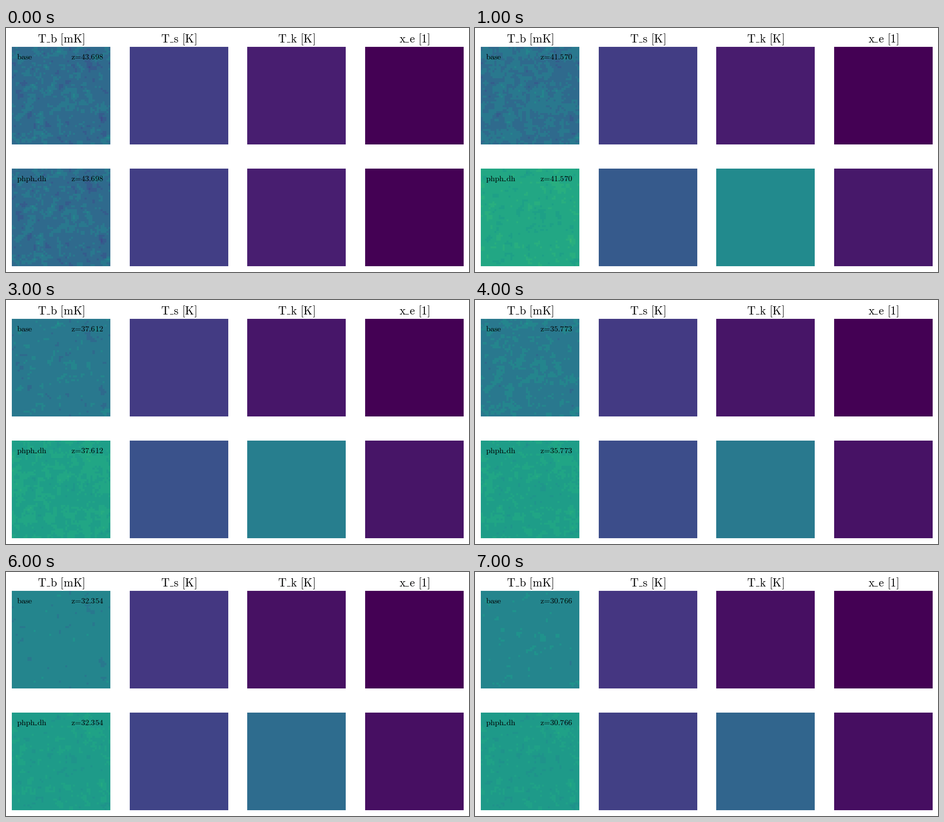
A matplotlib script for the animation above (8000 ms loop, 954 px wide and 505 px high).

```python
import numpy as np
import matplotlib.pyplot as plt
from matplotlib.animation import FuncAnimation

W, H, DPI = 954, 505, 64
PT = 72 / DPI               # points per pixel
N = 50                      # cells along one side of a map
MAP_W, MAP_H = 203, 202
LEFTS = [12 + 242.7 * c for c in range(4)]
TOPS = [39, 291]
TITLE_PX, NOTE_PX = 23.6, 16.4

plt.rcParams["mathtext.fontset"] = "cm"

# Main clumps and gaps of the density field: column, row
CLUMPS = [(5, 18), (3, 25), (5, 30), (9, 34.5), (23, 12.4), (28, 17.5),
          (38.5, 10), (45, 37), (46, 44), (37.5, 47)]
GAPS = [(26, 30), (3, 46), (15, 35), (25, 42), (30, 23), (48, 20), (20, 15),
        (6, 7)]


def blobs(points, radius):
    y, x = np.mgrid[:N, :N]
    return sum(np.exp(-((x - c) ** 2 + (y - r) ** 2) / radius ** 2)
               for c, r in points)


def make_field():
    """Cloudy noise plus the main blobs, reshaped to a bell curve."""
    rng = np.random.default_rng(4)
    f = np.fft.fftfreq(N) * N
    power = (f[:, None] ** 2 + f ** 2 + 30) ** -.75
    noise = np.fft.ifft2(np.fft.fft2(rng.normal(size=(N, N))) * power).real
    noise /= noise.std()
    field = .9 * noise - 2.6 * blobs(CLUMPS, 1.6) + 1.1 * blobs(GAPS, 3)
    rank = (field.ravel().argsort().argsort().reshape(N, N) + .5) / N ** 2
    return .55 * np.log(rank / (1 - rank))


FIELD = make_field()


def banded(base, step, offset):
    """Colour levels spaced by step from base."""
    return base + step * np.round(offset / step)


# Colormap value of each quantity at step i
def tb_base(i):
    mean = .357 + .0155 * i
    return banded(.29, .055, mean + .026 * .87 ** i * FIELD - .29)


def tb_heated(i):
    return banded(.572 - .004 * i, .03, .046 * .65 ** i - .0117 * FIELD)


def ts_base(i):
    return .186 - .0037 * i


def ts_heated(i):
    return .297 - .0156 * i


def tk_base(i):
    return .085 * .9 ** i


def tk_heated(i):
    return .505 - .0255 * i


def xe_base(i):
    return 0


def xe_heated(i):
    return .072 * .915 ** i


BASE = [tb_base, ts_base, tk_base, xe_base]
HEATED = [tb_heated, ts_heated, tk_heated, xe_heated]


def cells(rule, i):
    return np.broadcast_to(rule(i), (N, N))


fig = plt.figure(figsize=(W / DPI, H / DPI), dpi=DPI, facecolor="white")
stage = fig.add_axes([0, 0, 1, 1], zorder=2)
stage.set(xlim=(0, W), ylim=(H, 0))
stage.axis("off")


def roman(x, y, text, px):
    return stage.text(x, y, text, fontsize=px * PT, va="baseline", ha="left")


def label(x, y, head, head_em, tail, px):
    """Roman text whose two parts are joined by a low rule."""
    roman(x, y, rf"$\mathrm{{{head}}}$", px)
    rule = x + (head_em + .06) * px
    stage.add_patch(plt.Rectangle((round(rule), y - 1), round(.3 * px), 1,
                                  fc="black", lw=0))
    roman(x + (head_em + .36) * px, y, tail, px)


def unit_tail(letter, unit):
    return rf"$\mathrm{{{letter}}}\hspace{{0.38}}\mathrm{{[{unit}]}}$"


for x, head, em, letter, unit in [(65.3, "T", .722, "b", "mK"),
                                  (319.3, "T", .722, "s", "K"),
                                  (560.3, "T", .722, "k", "K"),
                                  (809.6, "x", .528, "e", "1")]:
    label(x, 30, head, em, unit_tail(letter, unit), TITLE_PX)

roman(22, 65, r"$\mathrm{base}$", NOTE_PX)
label(22, 317, "phph", 2.224, r"$\mathrm{dh}$", NOTE_PX)
shifts = [roman(134.3, top + 26, "", NOTE_PX) for top in TOPS]

maps = []
for top, rules in zip(TOPS, [BASE, HEATED]):
    for left, rule in zip(LEFTS, rules):
        ax = fig.add_axes([round(left) / W, 1 - (top + MAP_H) / H,
                           MAP_W / W, MAP_H / H])
        ax.axis("off")
        image = ax.imshow(cells(rule, 0), cmap="viridis", vmin=0, vmax=1,
                          interpolation="nearest", aspect="auto")
        maps.append(image)


def draw(i):
    z = 44.698 / 1.05 ** i - 1
    for text in shifts:
        text.set_text(r"$\mathrm{z}\hspace{-0.2}=\hspace{-0.2}"
                      rf"\mathrm{{{z:.3f}}}$")
    # Both models start out the same
    rules = BASE + (HEATED if i else BASE)
    for image, rule in zip(maps, rules):
        image.set_data(cells(rule, i))
    return shifts + maps


anim = FuncAnimation(fig, draw, frames=8, interval=1000, repeat=True,
                     repeat_delay=0)
plt.show()
```
